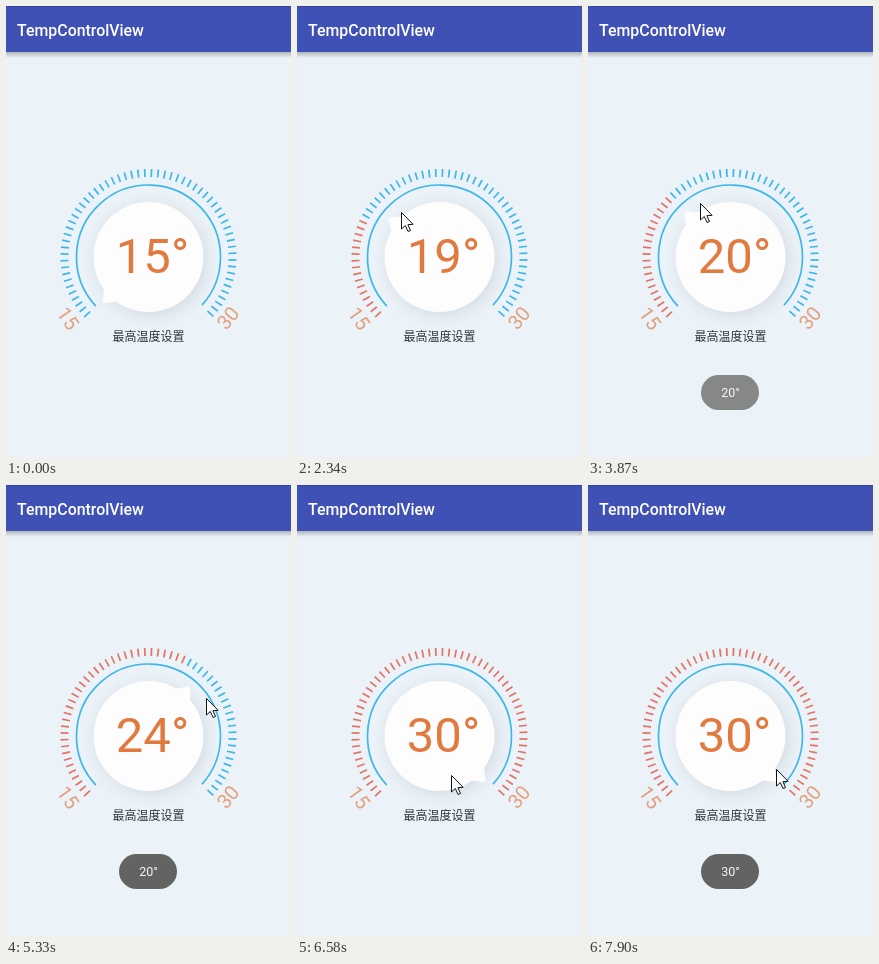
These frames come from a looping animation (285 px wide and 451 px high, 8000 ms). An HTML page with a canvas:

```html
<!DOCTYPE html>
<html lang="zh">
<head>
<meta charset="utf-8">
<title>TempControlView</title>
<style>
  html, body { margin: 0; width: 100%; height: 100%; overflow: hidden; background: #ebf2f8; }
  canvas { display: block; width: 285px; height: 451px; }
</style>
</head>
<body>
<canvas id="stage" width="285" height="451"></canvas>
<script>
const ctx = document.getElementById('stage').getContext('2d');
const LOOP = 8000, CX = 142.5, CY = 251;
const MIN_TEMP = 15, DEG_PER_TEMP = 18, TICKS_PER_TEMP = 4, TICK_COUNT = 60, SWEEP = 270;
const BLUE = '#3cb7ea', RED = '#e37364', WHITE = '#fdfdfe';

// The pointer circles the dial; angles are in degrees clockwise from the top.
const POINTER_START = { angle: -122, radius: 173 };
const POINTER_MOVES = [
  { start: 600, end: 1090, angle: -132, radius: 57 },
  { start: 1500, end: 2600, angle: -25.5, radius: 60 },
  { start: 2650, end: 3150, angle: -29.5, radius: 62 },
  { start: 4750, end: 5520, angle: 72, radius: 70 },
  { start: 5800, end: 6560, angle: 163.6, radius: 40.7 },
  { start: 6700, end: 7380, angle: 126, radius: 56 }
];
const POINTER_ENTERS = 680, KNOB_LAG = 100;
const DRAGS = [{ start: 1680, end: 3600 }, { start: 4800, end: 6640 }];
const TOASTS = [{ start: 3500, label: '20°' }, { start: 7380, label: '30°' }];
const TOAST_LIFE = 2450, FADE_IN = 500, FADE_OUT = 350;

const rad = deg => deg * Math.PI / 180;
const clamp = (v, lo, hi) => Math.min(hi, Math.max(lo, v));
const ease = p => p * p * (3 - 2 * p);
const mix = (a, b, p) => a + (b - a) * p;

function pointerAt(t) {
  return POINTER_MOVES.reduce((from, move) => {
    const p = ease(clamp((t - move.start) / (move.end - move.start), 0, 1));
    return { angle: mix(from.angle, move.angle, p), radius: mix(from.radius, move.radius, p) };
  }, POINTER_START);
}

// The knob trails the pointer during a drag and snaps to a whole degree on release.
function knobAt(t) {
  const drag = DRAGS.filter(d => d.start <= t).pop();
  if (!drag) return 0;
  const { angle } = pointerAt(Math.min(t - KNOB_LAG, drag.end));
  const turn = clamp(angle + SWEEP / 2, 0, SWEEP);
  return t < drag.end ? turn : Math.floor(turn / DEG_PER_TEMP) * DEG_PER_TEMP;
}

function text(str, x, y, font, color, align = 'center') {
  ctx.font = font;
  ctx.fillStyle = color;
  ctx.textAlign = align;
  ctx.fillText(str, x, y);
}

function polygon(points) {
  ctx.beginPath();
  points.forEach(([x, y]) => ctx.lineTo(x, y));
  ctx.closePath();
}

function at(x, y, angle, draw) {
  ctx.save();
  ctx.translate(x, y);
  ctx.rotate(rad(angle));
  draw();
  ctx.restore();
}

function drawHeader() {
  const shade = ctx.createLinearGradient(0, 46, 0, 52);
  shade.addColorStop(0, 'rgba(0,0,0,.25)');
  shade.addColorStop(1, 'rgba(0,0,0,0)');
  ctx.fillStyle = shade;
  ctx.fillRect(0, 46, 285, 6);
  ctx.fillStyle = '#3f51b5';
  ctx.fillRect(0, 0, 285, 46);
  ctx.fillStyle = '#35459f';
  ctx.fillRect(0, 0, 285, 1);
  text('TempControlView', 11, 30, '500 15.9px Roboto, sans-serif', '#fff', 'left');
}

function drawScale(temp) {
  const lit = (temp - MIN_TEMP) * TICKS_PER_TEMP;
  ctx.lineWidth = 1.7;
  for (let i = 0; i < TICK_COUNT; i++) {
    at(CX, CY, -133 + i * SWEEP / TICK_COUNT, () => {
      ctx.strokeStyle = i < lit ? RED : BLUE;
      ctx.beginPath();
      ctx.moveTo(0, -88);
      ctx.lineTo(0, -80);
      ctx.stroke();
    });
  }
  ctx.strokeStyle = BLUE;
  ctx.beginPath();
  ctx.arc(CX, CY, 72, rad(137), rad(402));
  ctx.stroke();

  const label = '20px Roboto, sans-serif';
  at(62, 312.5, 55, () => text('15', 0, 7, label, '#e4a07e'));
  at(222, 312, -50, () => text('30', 0, 7, label, '#e4a07e'));
  text('最高温度设置', CX, 334.7, '12px "Noto Sans CJK SC", "Noto Sans CJK", sans-serif', '#2f363e');
}

function drawKnob(turn, temp, showTip) {
  ctx.save();
  ctx.shadowColor = 'rgba(85,95,105,.16)';
  ctx.shadowBlur = 16;
  ctx.shadowOffsetX = ctx.shadowOffsetY = 3;
  ctx.fillStyle = WHITE;
  ctx.beginPath();
  ctx.arc(CX, CY, 55, 0, rad(360));
  ctx.fill();
  ctx.restore();
  if (showTip) {
    at(CX, CY, turn - SWEEP / 2, () => {
      ctx.fillStyle = WHITE;
      polygon([[-9.5, -53.5], [-1, -64], [1, -64], [9.5, -53.5]]);
      ctx.fill();
    });
  }
  text(temp + '°', 109.8, 266.7, '49px Roboto, sans-serif', '#e27a3f', 'left');
}

function drawToast({ start, label }, t) {
  const age = t - start;
  const alpha = clamp(Math.min(age / FADE_IN, (TOAST_LIFE - age) / FADE_OUT), 0, 1);
  if (alpha === 0) return;
  ctx.save();
  ctx.globalAlpha = alpha;
  ctx.fillStyle = '#636462';
  ctx.beginPath();
  ctx.roundRect(113, 369, 58, 35, 17.5);
  ctx.fill();
  ctx.restore();
  text(label, CX, 391.3, '12.5px Roboto, sans-serif', '#f6f6f6');
}

function drawPointer({ angle, radius }) {
  const x = Math.round(CX + radius * Math.sin(rad(angle)));
  const y = Math.round(CY - radius * Math.cos(rad(angle)));
  at(x + .5, y + .5, 0, () => {
    polygon([[0, 0], [0, 16.5], [3.8, 13], [6.6, 19], [9, 18], [6.4, 12.2], [11.6, 11.8]]);
    ctx.fillStyle = '#fff';
    ctx.fill();
    ctx.lineWidth = 1;
    ctx.strokeStyle = '#111';
    ctx.stroke();
  });
}

function render(t) {
  const turn = knobAt(t);
  const temp = MIN_TEMP + Math.floor(turn / DEG_PER_TEMP);
  const tipCovered = t > 1000 && t < DRAGS[0].start;

  ctx.fillStyle = '#ebf2f8';
  ctx.fillRect(0, 0, 285, 451);
  drawHeader();
  drawScale(temp);
  drawKnob(turn, temp, !tipCovered);
  TOASTS.forEach(toast => drawToast(toast, t));
  if (t >= POINTER_ENTERS) drawPointer(pointerAt(t));
}

const origin = performance.now();
function tick() {
  render((performance.now() - origin) % LOOP);
  requestAnimationFrame(tick);
}
tick();
</script>
</body>
</html>
```
